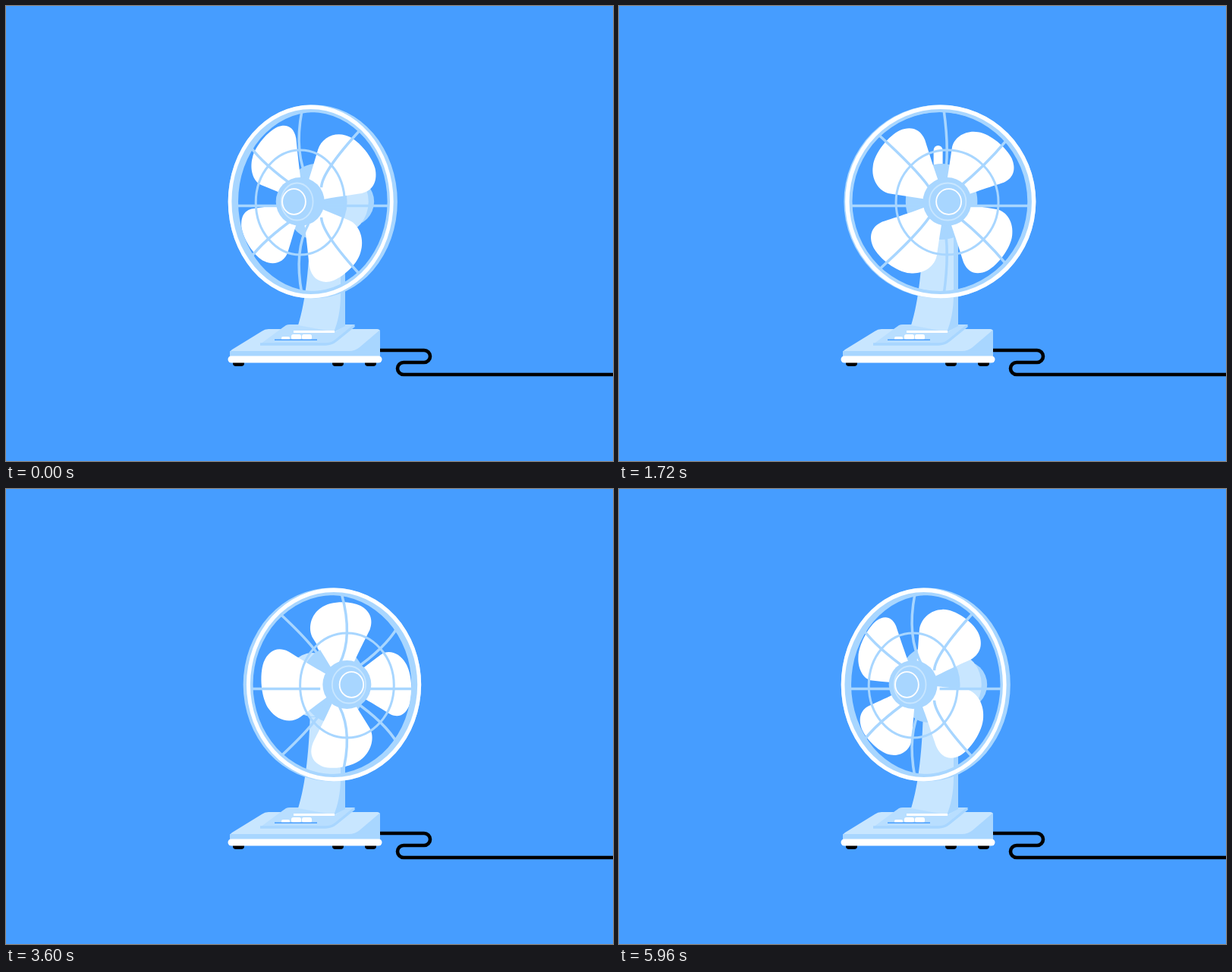
Write an HTML page with a canvas that moves like this. It is 800 by 600 pixels and loops after 6 s.

```html
<!DOCTYPE html>
<html lang="en">
<head>
<meta charset="utf-8">
<title>Desk fan</title>
<style>
html, body { margin: 0; width: 100%; height: 100%; overflow: hidden; background: #469dff; }
canvas { display: block; }
</style>
</head>
<body>
<canvas id="stage" width="800" height="600"></canvas>
<script>
const ctx = document.getElementById('stage').getContext('2d');
const BLUE = '#469dff', PALE = '#a8d6ff', LIGHT = '#c8e6ff', WHITE = '#fff', BLACK = '#000';
const LOOP = 6000, STEP = 40, AXIS = 421, CY = 258;
const TAU = Math.PI * 2, RAD = Math.PI / 180;

// Bezier outline of one blade pointing right: start, then three points per curve.
const BLADE = [
  [10, -8], [28, -18], [44, -29], [60, -39],
  [73, -47], [91, -41], [100, -27],
  [110, -13], [111, 16], [105, 31],
  [99, 44], [88, 51], [73, 44],
  [58, 35], [30, 18], [10, 8]
];

const shape = {
  neck: 'M401 290C400 340 395 390 385 421L434 430 447 421V290Z',
  neckShade: 'M441 290V380C441 402 437 418 432 430L447 422V290Z',
  neckTop: 'M401 290H447V301H400Z',
  top: 'M295 462V457Q295 455 298 453L337 429Q341 426 346 426H489Q493 426 493 430V462Z',
  front: 'M295 455H452Q460 455 466 450L493 427V464H295Z',
  plate: 'M335 446H421Q429 446 435 441L460 421Q460 420 458 420H374Q371 420 369 421L362 426Z',
  plateEdge: 'M335 446H421Q429 446 435 441L459 421.5',
  cable: 'M493 454H551A8 8 0 0 1 551 470H524A8 8 0 0 0 524 486H802'
};
for (const key in shape) shape[key] = new Path2D(shape[key]);

function fill(path, color) {
  ctx.fillStyle = color;
  ctx.fill(path);
}

function line(path, color, width) {
  ctx.strokeStyle = color;
  ctx.lineWidth = width;
  ctx.stroke(path);
}

function oval(x, rx, ry, y = CY) {
  const path = new Path2D();
  path.ellipse(x, y, rx, ry, 0, 0, TAU);
  return path;
}

function box(x, y, w, h, radius, color) {
  const path = new Path2D();
  path.roundRect(x, y, w, h, radius);
  fill(path, color);
}

// Elliptical band between two radii, foreshortened by c.
function band(x, outer, inner, c, color) {
  const path = oval(x, outer * c, outer);
  path.addPath(oval(x, inner * c, inner));
  ctx.fillStyle = color;
  ctx.fill(path, 'evenodd');
}

function drawStand() {
  line(shape.cable, BLACK, 4.6);
  for (const x of [299, 430, 473]) box(x, 467, 15, 8, 4, BLACK);
  fill(shape.top, LIGHT);
  fill(shape.front, PALE);
  fill(shape.plate, '#b8deff');
  line(shape.plateEdge, PALE, 3.5);
  fill(shape.neck, LIGHT);
  fill(shape.neckShade, PALE);
  fill(shape.neckTop, PALE);
  line(new Path2D('M379 429.5H433'), WHITE, 3);
  box(363, 436, 11, 5, 2, WHITE);
  box(376, 433, 13, 7, 2.5, WHITE);
  box(390, 433, 13, 7, 2.5, WHITE);
  line(new Path2D('M354 440.2H410'), BLUE, 1.5);
  box(292.5, 461.5, 203, 9, 4.5, WHITE);
}

function drawMotor(s, c) {
  box(417.5 - 17 * s, 184, 12, 30, 6, WHITE);
  fill(oval(AXIS - 62 * s, 32, 32), PALE);
  fill(oval(AXIS - 40 * s, 36, 42), LIGHT);
  fill(oval(AXIS + 24 * s, 48 * c, 50), PALE);
}

function drawBlades(s, c, turn) {
  const path = new Path2D();
  for (let i = 0; i < 4; i++) {
    const a = turn + i * TAU / 4, cos = Math.cos(a), sin = Math.sin(a);
    const p = BLADE.map(([x, y]) => {
      const u = x * cos - y * sin, v = x * sin + y * cos;
      const near = 1 / (1 + s * u / 600);
      return [AXIS - 1.5 + 55 * s + u * c * near, CY + v * near];
    });
    path.moveTo(...p[0]);
    for (let j = 1; j < p.length; j += 3) path.bezierCurveTo(...p[j], ...p[j + 1], ...p[j + 2]);
    path.closePath();
  }
  fill(path, WHITE);
}

function drawGuard(s, c, rim) {
  const path = new Path2D();
  for (let i = 0; i < 8; i++) {
    const a = i * TAU / 8, side = i % 4 ? (i < 4 ? 1 : -1) : 0;
    const y = side ? CY + 1 : 263.5;
    const at = (x, r, angle) => [x + r * c * Math.cos(angle), y + r * Math.sin(angle)];
    const start = at(rim, 121, a - 0.22 * s * side);
    const mid = at(AXIS + 66 * s, 69, a);
    const end = at(AXIS + 43 * s, 28, a);
    const bend = mid.map((m, k) => 2 * m - (start[k] + end[k]) / 2);
    path.moveTo(...start);
    path.quadraticCurveTo(...bend, ...end);
  }
  line(path, PALE, 3.5);
  line(oval(AXIS + 0.5 + 65 * s, 68.5 * c, 69, 259), PALE, 3);

  band(rim - 10 * s, 127.5, 118, c, PALE);
  band(rim, 127.5, 118, c, PALE);
  band(rim, 127.5, 122, c, WHITE);
}

function drawHub(s, c) {
  fill(oval(AXIS + 0.4 + 65 * s, 32, 32), PALE);
  line(oval(AXIS + 72 * s, 24.5 * c, 24.5), LIGHT, 1.8);
  line(oval(AXIS + 80 * s, 8.3 + 8.3 * c, 16.8), WHITE, 1.8);
}

function draw(t) {
  const yaw = (0.7 - 32 * Math.cos(TAU * (t + 55) / LOOP)) * RAD;
  const s = Math.sin(yaw), c = Math.cos(yaw);
  const turn = TAU * t / 1000 - 38 * RAD;
  fill(new Path2D('M0 0H800V600H0Z'), BLUE);
  drawStand();
  drawMotor(s, c);
  drawBlades(s, c, turn);
  drawGuard(s, c, 418.3 + 32 * s);
  drawHub(s, c);
}

// The motion advances at 25 pictures per second.
function tick() {
  draw(Math.floor(performance.now() % LOOP / STEP) * STEP);
  requestAnimationFrame(tick);
}
tick();
</script>
</body>
</html>
```
